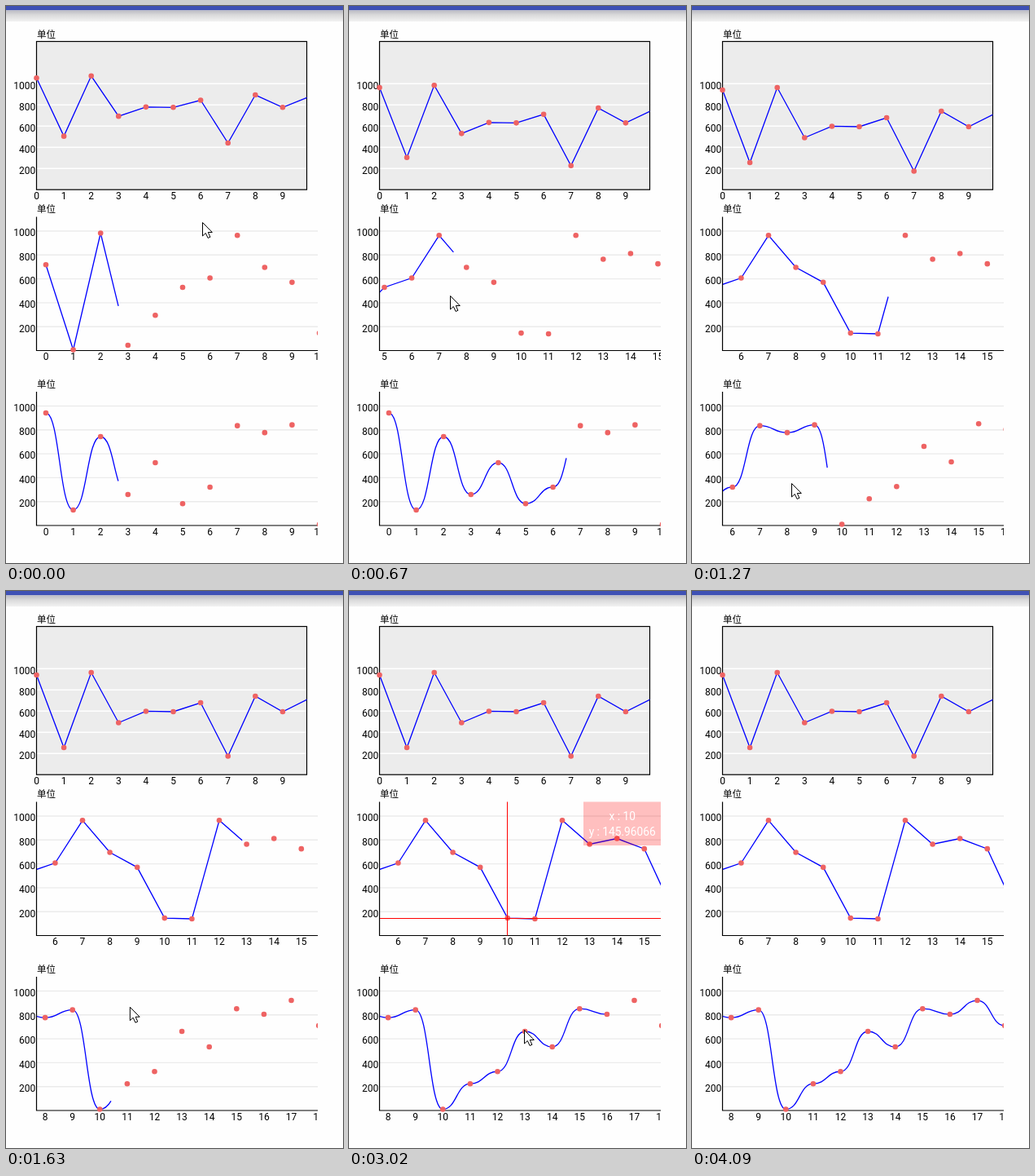
An HTML page that plays this animation: 414x683 px, repeating every 4.65 s.

```html
<!DOCTYPE html>
<html lang="zh">
<head>
<meta charset="utf-8">
<style>
  html, body { margin: 0; width: 100%; height: 100%; overflow: hidden; background: #fefefe; }
  svg { display: block; }
  text { font: 12px Roboto, sans-serif; }
  .unit { font: 500 11.5px "Noto Sans CJK SC", "Noto Sans CJK", sans-serif; }
  .end { text-anchor: end; }
  .mid { text-anchor: middle; }
  .info { font-size: 13.75px; fill: #fff; text-anchor: middle; }
  .line { fill: none; stroke: #00f; stroke-width: 1.3; }
  .dot { fill: #ee6363; }
  .axis { fill: none; stroke: #000; stroke-width: 1.2; }
</style>
</head>
<body>
<svg id="stage" width="414" height="683" viewBox="0 0 414 683">
  <defs>
    <linearGradient id="shade" x2="0" y2="1">
      <stop offset="0" stop-color="#b9b9c2"/>
      <stop offset=".4" stop-color="#d9d9da"/>
      <stop offset="1" stop-color="#f2f2f2"/>
    </linearGradient>
  </defs>
  <rect width="414" height="5.3" fill="#3f51b5"/>
  <rect y="5.3" width="414" height="13.7" fill="url(#shade)"/>
</svg>
<script>
const LOOP = 4650, STEP = 33.6, LEFT = 37.5, RIGHT = 383;
const stage = document.getElementById('stage');

function add(parent, tag, attrs, text) {
  const node = document.createElementNS('http://www.w3.org/2000/svg', tag);
  for (const key in attrs) node.setAttribute(key, attrs[key]);
  if (text !== undefined) node.textContent = text;
  return parent.appendChild(node);
}

function clipGroup(id, x, y, right, bottom) {
  const clip = add(stage, 'clipPath', { id });
  add(clip, 'rect', { x, y, width: right - x, height: bottom - y });
  return add(stage, 'g', { 'clip-path': `url(#${id})` });
}

function drawScale(base, gap, right, color) {
  for (let k = 1; k <= 5; k++) {
    const y = base - k * gap;
    add(stage, 'path', { d: `M38 ${y}H${right}`, stroke: color, 'stroke-width': 1.4 });
    add(stage, 'text', { class: 'end', x: 36.3, y: y + 6.3 }, k * 200);
  }
}

const clamp = u => Math.min(1, Math.max(0, u));
const easeOut = (t, from, to, power) => 1 - (1 - clamp((t - from) / (to - from))) ** power;

const polyline = pts => 'M' + pts.map(p => p.join(' ')).join('L');
const wave = pts => pts.map(([x, y], i) => {
  if (!i) return `M${x} ${y}`;
  const m = x - STEP / 2;
  return `C${m} ${pts[i - 1][1]} ${m} ${y} ${x} ${y}`;
}).join('');

// Values fall from a common level and settle with a quadratic ease.
function settlingChart(values) {
  const base = 225.2, top = 43.5, right = 369.5, level = 1517;
  add(stage, 'text', { class: 'unit', x: 38, y: 38.7 }, '单位');
  add(stage, 'rect', { x: 38, y: top, width: right - 38, height: base - top, fill: '#ececec' });
  drawScale(base, 26, right, '#fff');
  add(stage, 'rect', { class: 'axis', x: LEFT, y: top, width: right - LEFT, height: base - top });
  const plot = clipGroup('plot1', 30, 40, right, 240);
  const line = add(plot, 'path', { class: 'line' });
  const dots = values.slice(0, -1).map((_, i) => {
    const x = LEFT + i * STEP;
    add(stage, 'text', { class: 'mid', x, y: 237 }, i);
    return add(plot, 'circle', { class: 'dot', cx: x, r: 3.3 });
  });
  return t => {
    const settled = easeOut(t, -1500, 1200, 2);
    const pts = values.map((v, i) =>
      [LEFT + i * STEP, base - 0.13 * (level + (v - level) * settled)]);
    line.setAttribute('d', polyline(pts));
    dots.forEach((dot, i) => dot.setAttribute('cy', pts[i][1]));
  };
}

// The line is traced by length at a falling speed while the plot scrolls sideways.
function scrollingChart({ id, base, values, shape, traced, scrolled, cross }) {
  const top = base - 164;
  const pts = values.map((v, i) => [49 + i * STEP, base - v * 0.1465]);
  add(stage, 'text', { class: 'unit', x: 38, y: top - 5.5 }, '单位');
  drawScale(base, 29.3, RIGHT, '#ebebeb');
  add(stage, 'path', { class: 'axis', d: `M${LEFT} ${top}V${base}H${RIGHT}` });

  const plot = add(clipGroup(id, 38, top, RIGHT, base + 16), 'g', {});
  const line = add(plot, 'path', { class: 'line', d: shape(pts) });
  pts.forEach(([cx, cy], i) => {
    add(plot, 'circle', { class: 'dot', cx, cy, r: 3.3 });
    add(plot, 'text', { class: 'mid', x: cx, y: base + 11.9 }, i);
  });

  const [pickX, pickY] = pts[cross.index];
  const x = Math.floor(pickX - scrolled(LOOP)) + 0.5, y = Math.floor(pickY) + 0.5;
  const mark = add(stage, 'g', {});
  add(mark, 'path', { d: `M${x} ${top}V${base}M38 ${y}H${RIGHT}`, stroke: cross.color });
  add(mark, 'rect', { x: 288, y: top, width: 95, height: 53.5, fill: 'rgba(255,0,0,.25)' });
  [`x : ${cross.index}`, `y : ${values[cross.index]}`].forEach((label, i) =>
    add(mark, 'text', { class: 'info', x: 335.7, y: top + 22.3 + i * 19 }, label));

  const total = line.getTotalLength();
  return t => {
    plot.setAttribute('transform', `translate(${-scrolled(t)})`);
    line.setAttribute('stroke-dasharray', `${Math.min(total, traced(t))} ${total}`);
    mark.setAttribute('visibility', t >= cross.from && t < cross.to ? 'visible' : 'hidden');
  };
}

function pointer() {
  const arrow = add(stage, 'path', {
    d: 'M0 0V16.5L3.8 13L6.6 19L9.4 17.8L6.8 12H11.8Z',
    fill: '#fff', stroke: '#000', 'stroke-width': 1
  });
  const stops = [
    [0, 241.5, 265.5], [520, 298, 350], [670, 124.5, 355.5], [1030, 320, 580],
    [1270, 122.5, 585.5], [2150, 195.5, 401.5], [2420, 195.5, 401.5],
    [2900, 215.5, 538.5], [3180, 215.5, 538.5], [3330, 225.5, 541.5], [3930, 440, 700]
  ];
  return t => {
    const next = stops.findIndex(s => s[0] > t);
    const b = stops[next < 0 ? stops.length - 1 : next];
    const a = next < 0 ? b : stops[next - 1];
    const u = a === b ? 1 : (t - a[0]) / (b[0] - a[0]);
    const [x, y] = [1, 2].map(n => a[n] + (b[n] - a[n]) * u);
    arrow.setAttribute('transform', `translate(${x} ${y})`);
  };
}

const parts = [
  settlingChart([940, 255, 963, 490, 598, 594, 678, 175, 740, 594, 722]),
  scrollingChart({
    id: 'plot2', base: 422.5, shape: polyline,
    values: [718, 7, 983, 44, 295, 529, 607, 964, 696, 571, 145.96066, 140, 964, 765, 812, 726, 229],
    traced: t => 348.4 + 0.432 * t - 3.85e-5 * t * t,
    scrolled: t => 190.2 * easeOut(t, 520, 790, 3),
    cross: { index: 10, color: '#f00', from: 2420, to: 3180 }
  }),
  scrollingChart({
    id: 'plot3', base: 637, shape: wave,
    values: [942, 130, 744, 259, 526, 183, 321, 835, 777, 842, 10, 224, 326, 662.13055,
      532, 852, 805, 921, 710],
    traced: t => 287 + 0.3545 * t - 3.5e-5 * t * t,
    scrolled: t => 269.7 * easeOut(t, 1035, 1510, 2),
    cross: { index: 13, color: '#444', from: 3330, to: 4090 }
  }),
  pointer()
];

// The picture holds for 120 ms at a time, a little longer before each of these marks.
const marks = [0, 520, 670, 2150, 2420, 3180, 3330, 4090, LOOP];
function hold(t) {
  const i = marks.findIndex(m => m > t) - 1;
  const start = marks[i], most = Math.floor((marks[i + 1] - start) / 120) - 1;
  return start + 120 * Math.min(most, Math.floor((t - start) / 120));
}

const begin = performance.now();
function render() {
  const t = hold((performance.now() - begin) % LOOP);
  parts.forEach(update => update(t));
  requestAnimationFrame(render);
}
render();
</script>
</body>
</html>
```
